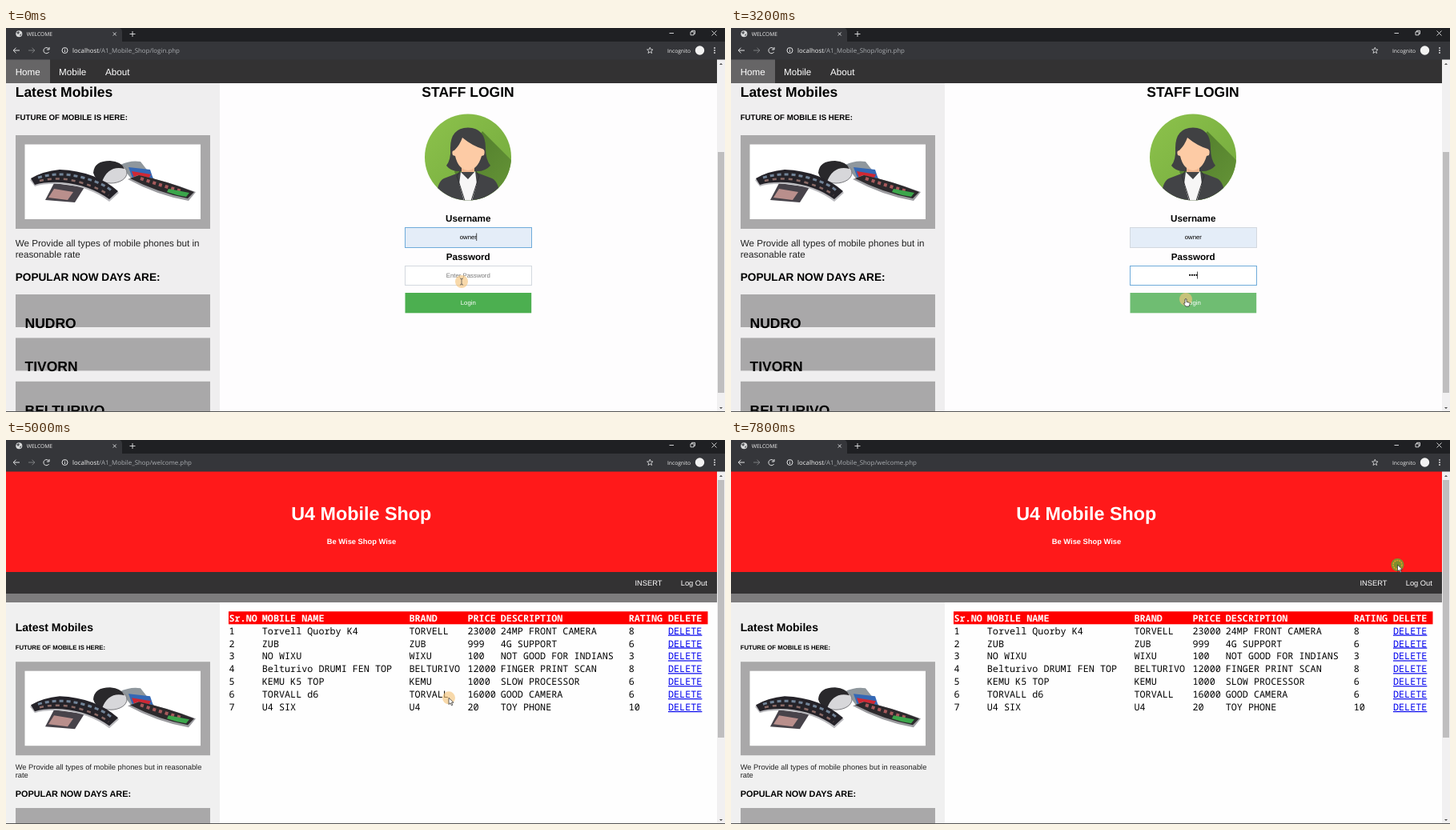
Animation, 898 px wide and 480 px high, one loop 8 s. Source, as an HTML page:

```html
<!DOCTYPE html>
<html lang="en">
<head>
<meta charset="utf-8">
<title>WELCOME</title>
<style>
html, body { margin: 0; width: 100%; height: 100%; overflow: hidden; background: #fefdfe; }
svg { display: block; width: 100%; height: 100%; }
text { font-family: "Liberation Sans", Arial, sans-serif; white-space: pre; text-rendering: geometricPrecision; }
.ui { font-family: "Open Sans", "Noto Sans", sans-serif; font-size: 6.7px; fill: #eee; }
.url { font-size: 7.9px; fill: #a9acb0; }
.bold { font-weight: bold; }
.mid { text-anchor: middle; }
.white { fill: #fff; }
.h2 { font-size: 17.5px; font-weight: bold; }
.p { font-size: 11.67px; }
.field { font-size: 7.8px; text-anchor: middle; }
.small { font-size: 9.34px; }
.table text { font: 11.77px "Noto Sans Mono", "DejaVu Sans Mono", monospace; }
.table .head { font-weight: bold; fill: #fff; }
.table .link { fill: #00e; text-decoration: underline; }
.line { fill: none; stroke: #e4e5e6; }
</style>
</head>
<body>
<svg viewBox="0 0 898 480" preserveAspectRatio="none">
  <defs>
    <clipPath id="disc"><circle cx="577" cy="161.5" r="54"/></clipPath>
    <linearGradient id="green" x2="1" y2="1"><stop stop-color="#8dc24c"/><stop offset="1" stop-color="#72a93c"/></linearGradient>
    <linearGradient id="shade" x2="1" y2="1"><stop stop-color="#4f7a2b"/><stop offset="1" stop-color="#6b9c3a"/></linearGradient>
    <g id="photo">
      <rect x="12" y="134" width="243" height="117" fill="#a9a8a9"/>
      <rect x="23.5" y="145.5" width="219.5" height="93.5" fill="#fff"/>
      <path d="M49 215L60 194 98 199 86 218Z" fill="#47434a"/>
      <path d="M53 212L60 201 84 205 77 215Z" fill="#b98f8c"/>
      <path d="M143 171Q155 165 168 167L186 190 156 188Z" fill="#8f979d"/>
      <path d="M153 174L180 177 184 189 158 188Z" fill="#3568b5"/>
      <path d="M157 179L181 183 177 190 160 187Z" fill="#cf2834"/>
      <ellipse cx="131" cy="181" rx="20" ry="13" fill="#d7d7da" stroke="#77777b"/>
      <path d="M109 181Q110 166 130 166Q144 167 148 176Q128 171 120 192Q111 189 109 181Z" fill="#29282b"/>
      <path d="M30 190Q45 180 67 178Q112 180 141 206L129 217Q104 198 70 195Q48 194 36 198Z" fill="#b9b9bd"/>
      <path d="M31 188Q46 179 67 177Q112 179 140 204L129 214Q104 196 70 193Q48 192 36 196Z" fill="#252329"/>
      <path d="M40 187Q67 179 96 187T133 205" fill="none" stroke="#718397" stroke-width="3" stroke-dasharray="5 4"/>
      <path d="M42 191Q67 185 93 193T128 209" fill="none" stroke="#8a6a66" stroke-width="2.5" stroke-dasharray="5 5"/>
      <path d="M152 189L165 184Q200 191 237 205L228 216Q188 209 152 189Z" fill="#9c9ca0"/>
      <path d="M155 188L166 184Q200 191 235 205L227 213Q190 206 155 188Z" fill="#2c292c"/>
      <path d="M168 188Q194 197 220 204" fill="none" stroke="#a85a5c" stroke-width="4" stroke-dasharray="4 4"/>
      <path d="M203 201L229 206 225 211Q212 209 201 205Z" fill="#3ba64b"/>
    </g>
    <path id="arrow" d="M0 0V8.2L2 6.4 3.4 9.5 4.8 8.9 3.4 5.9H6Z" fill="#fff" stroke="#222" stroke-width=".7"/>
    <path id="hand" d="M-1 0Q0-1 1 0V3.4L4.6 4.3Q5.4 4.7 5 6.2L4 9H0L-2.6 5.4Q-2.4 4.2-1 5.2Z" fill="#fff" stroke="#222" stroke-width=".7"/>
    <path id="beam" d="M-2-4Q0-4 0-2.8Q0-4 2-4M0-3V3M-2 4Q0 4 0 2.8Q0 4 2 4" fill="none" stroke="#444" stroke-width=".7"/>
  </defs>

  <g id="login">
    <rect width="898" height="480" fill="#fefdfe"/>
    <rect y="69" width="267" height="411" fill="#efeeef"/>
    <rect y="39" width="888" height="30" fill="#333233"/>
    <rect y="39" width="55" height="30" fill="#666566"/>
    <g class="p white"><text x="11.7" y="58.6">Home</text><text x="66" y="58.6">Mobile</text><text x="124" y="58.6">About</text></g>
    <text class="h2" x="11.7" y="86">Latest Mobiles</text>
    <text class="bold" x="11.7" y="115.4" font-size="9.69">FUTURE OF MOBILE IS HERE:</text>
    <use href="#photo"/>
    <g class="p" fill="#222"><text x="11.7" y="273">We Provide all types of mobile phones but in</text><text x="11.7" y="286.7">reasonable rate</text></g>
    <text class="bold" x="11.7" y="315.8" font-size="13.65">POPULAR NOW DAYS ARE:</text>
    <g id="brands"></g>

    <text class="h2 mid" x="577" y="86">STAFF LOGIN</text>
    <g clip-path="url(#disc)">
      <rect x="523" y="107" width="108" height="109" fill="url(#green)"/>
      <path d="M595 129L650 184V230H590L560 180Z" fill="url(#shade)"/>
      <path d="M550 172Q556 164 555 150Q555 125 577 124.5Q599 125 599 150Q599 164 605 172Q598 180 586 179H568Q556 180 550 172Z" fill="#404143"/>
      <path d="M569 168H585V183L577 193 569 183Z" fill="#efb58e"/>
      <path d="M537 216Q538 192 547 188L568 180H586L607 188Q616 192 618 216Z" fill="#424346"/>
      <path d="M568 180L577 189 586 179 588 195 582 216H572L566 195Z" fill="#f7f6f6"/>
      <path d="M567 179L563 185 566 194 573 216M587 179L591 185 588 194 581 216" fill="none" stroke="#2f3032"/>
      <path d="M560 153Q567 146 570 137Q582 147 595 151Q599 152 597 159L594 160Q589 177 577 178Q565 177 561 160L558 159Q556 153 560 153Z" fill="#fdcba5"/>
    </g>
    <text class="p bold mid" x="577.2" y="241.8">Username</text>
    <rect id="userBox" x="498.5" y="249.5" width="158" height="25" fill="#e4edf8"/>
    <text class="field" x="577.3" y="263.8">owner</text>
    <text class="p bold mid" x="577.2" y="289.7">Password</text>
    <rect id="passBox" x="498.5" y="297.5" width="158" height="24" fill="#fff"/>
    <text class="field" id="hint" x="577.3" y="311.7" fill="#777">Enter Password</text>
    <g id="dots"></g>
    <path id="caret" stroke="#222" stroke-width=".8"/>
    <rect id="button" x="498.5" y="331" width="157.7" height="25.3"/>
    <text class="field white" x="577.3" y="346.3">Login</text>
  </g>

  <g id="welcome">
    <rect width="898" height="480" fill="#fefefe"/>
    <rect y="39" width="888" height="126" fill="#ff191a"/>
    <rect y="165" width="888" height="27" fill="#333233"/>
    <rect y="192" width="888" height="11" fill="#7d7c7d"/>
    <rect y="203" width="267" height="277" fill="#f0f0f0"/>
    <text class="bold mid white" x="443.7" y="100.3" font-size="23.35">U4 Mobile Shop</text>
    <text class="small bold mid white" x="444" y="129.7">Be Wise Shop Wise</text>
    <g class="small white"><text x="785.5" y="181.5">INSERT</text><text x="842.7" y="181.5">Log Out</text></g>
    <text class="bold" x="11.7" y="238.5" font-size="14">Latest Mobiles</text>
    <text class="bold" x="11.7" y="262" font-size="7.75">FUTURE OF MOBILE IS HERE:</text>
    <use href="#photo" y="143.2"/>
    <g class="small" fill="#222"><text x="11.7" y="411.5">We Provide all types of mobile phones but in reasonable</text><text x="11.7" y="422.3">rate</text></g>
    <text class="bold" x="11.7" y="446" font-size="10.9">POPULAR NOW DAYS ARE:</text>
    <rect x="12" y="460" width="243" height="20" fill="#a9a8a9"/>
    <rect x="278" y="214.3" width="598.5" height="16" fill="#f00"/>
    <g class="table" id="table"></g>
  </g>

  <rect x="888" y="39" width="10" height="441" fill="#f1f0f1"/>
  <rect id="thumb" x="889" width="8" fill="#bfbebf"/>
  <path d="M891 46L893 43.8 895 46ZM891 474L893 476.2 895 474Z" fill="#555"/>
  <rect y="479" width="898" height="1" fill="#555"/>

  <rect width="898" height="18" fill="#1f2023"/>
  <path d="M0 0H142Q145 1 145 5V17H0Z" fill="#35363a"/>
  <rect y="17" width="898" height="22.5" fill="#35363a"/>
  <circle cx="16.3" cy="7.3" r="4" fill="#d9dadb"/>
  <path d="M13 5.5L16 4 17 6 15 8ZM17 8.5L19.5 7 18 10.5Z" fill="#55575b"/>
  <text class="ui" x="25.7" y="9.8">WELCOME</text>
  <path class="line" d="M133.7 5.5L137.7 9.5M137.7 5.5L133.7 9.5M154.5 7.5H161.5M158 4V11M828.5 6.5H834M855 4.8H859V8.8H855ZM856.5 4.8V3.3H860.5V7.3H859M881.5 3.5L887.5 9.5M887.5 3.5L881.5 9.5" stroke-width=".9"/>
  <path class="line" d="M17 28H9.3M12.5 24.7L9.2 28 12.5 31.3M53.6 26.3A3.6 3.6 0 1 0 53.6 30M54 24V27H51"/>
  <path class="line" d="M28 28H35.5M32.5 24.7L35.8 28 32.5 31.3" opacity=".4"/>
  <circle class="line" cx="73.5" cy="28" r="3.5"/>
  <path class="line" d="M73.5 27.5V30M73.5 25.7V26.5"/>
  <text class="ui url" x="83" y="30.8"><tspan fill="#f2f2f2">localhost</tspan><tspan id="address"></tspan></text>
  <path class="line" d="M804.3 24.2L805.3 26.8 808 27 805.9 28.8 806.6 31.5 804.3 30 802 31.5 802.7 28.8 800.6 27 803.3 26.8Z" stroke-width=".8"/>
  <text class="ui" x="826" y="30.5">Incognito</text>
  <circle cx="866.5" cy="28" r="5.7" fill="#f2f2f2"/>
  <g fill="#e4e5e6"><circle cx="885" cy="25" r=".9"/><circle cx="885" cy="28" r=".9"/><circle cx="885" cy="31" r=".9"/></g>

  <g id="pointer">
    <circle id="halo" r="8"/>
    <circle id="ring" r="5.5" fill="none" stroke="#e59a2c" stroke-width="1.5" stroke-dasharray="2 1"/>
    <use id="cursor"/>
  </g>
</svg>
<script>
const LOOP = 8000, STEP = 200;
const FOCUS_AT = 800, TYPE_AT = 1600, SUBMIT_AT = 3600, PAGE_AT = 4200;
const byId = id => document.getElementById(id);
const set = (id, attrs) => {
  for (const [name, value] of Object.entries(attrs)) byId(id).setAttribute(name, value);
};
const show = (id, visible) => { byId(id).style.display = visible ? "" : "none"; };

byId("brands").innerHTML = ["NUDRO", "TIVORN", "BELTURIVO"].map((name, i) => {
  const y = 333 + i * 54.4;
  return `<rect x="12" y="${y}" width="243" height="41" fill="#a9a8a9"/>
    <text class="h2" x="23.5" y="${y + 42}">${name}</text>`;
}).join("");

const columns = [278.5, 319.8, 503.5, 576.5, 617.7, 777.7, 827];
const rows = [
  "Sr.NO|MOBILE NAME|BRAND|PRICE|DESCRIPTION|RATING",
  "1|Torvell Quorby K4|TORVELL|23000|24MP FRONT CAMERA|8",
  "2|ZUB|ZUB|999|4G SUPPORT|6",
  "3|NO WIXU|WIXU|100|NOT GOOD FOR INDIANS|3",
  "4|Belturivo DRUMI FEN TOP|BELTURIVO|12000|FINGER PRINT SCAN|8",
  "5|KEMU K5 TOP|KEMU|1000|SLOW PROCESSOR|6",
  "6|TORVALL d6|TORVALL|16000|GOOD CAMERA|6",
  "7|U4 SIX|U4|20|TOY PHONE|10"
];
byId("table").innerHTML = rows.map((row, r) => [...row.split("|"), "DELETE"].map((cell, c) => {
  const kind = r === 0 ? "head" : c === 6 ? "link" : "";
  return `<text class="${kind}" x="${columns[c]}" y="${226.7 + r * 15.9}">${cell}</text>`;
}).join("")).join("");

// time, x, y
const path = [
  [0, 569, 317], [2000, 568.5, 317], [2400, 568, 332], [2800, 568, 339], [4800, 568, 339],
  [6000, 478, 239], [6800, 850, 239], [7200, 850, 330], [7800, 832.5, 156], [8000, 832.5, 156]
];
function pointerAt(t) {
  const i = path.findIndex(key => key[0] > t);
  const [t0, x0, y0] = path[i - 1], [t1, x1, y1] = path[i];
  const k = (t - t0) / (t1 - t0);
  return [x0 + (x1 - x0) * k, y0 + (y1 - y0) * k];
}

function cursorFor(t, x, y) {
  if (t < PAGE_AT) return y < 323 ? "beam" : y > 333 ? "hand" : "arrow";
  const onLink = x > 827 && x < 870 && y > 231 && y < 340;
  return t <= 4800 || onLink ? "hand" : "arrow";
}

function drawLogin(t, y) {
  const inUser = t < FOCUS_AT, inPass = !inUser && t < SUBMIT_AT;
  const count = Math.max(0, Math.min(4, (t - TYPE_AT) / STEP + 1));
  const border = focused => focused ? "#6fabda" : "#d3d8df";
  set("userBox", { stroke: border(inUser) });
  set("passBox", { stroke: border(inPass) });
  set("button", { fill: y > 333 ? "#6fbd72" : "#4caf50", stroke: t >= SUBMIT_AT ? "#58a9c6" : "none" });
  show("hint", !count);
  byId("dots").innerHTML = Array.from({ length: count }, (_, i) =>
    `<circle cx="${577.3 + (i - (count - 1) / 2) * 2.8}" cy="308.8" r="1.1"/>`).join("");
  const userCaret = inUser && t < 600;
  const passCaret = inPass && count && (t < 2600 || t % 1000 < 500);
  set("caret", { d: userCaret ? "M587.7 256.5V266" : passCaret ? `M${576.9 + count * 1.4} 304.5V313.5` : "" });
}

function draw(t) {
  const [x, y] = pointerAt(t);
  const onLogin = t < PAGE_AT;
  show("login", onLogin);
  show("welcome", !onLogin);
  if (onLogin) drawLogin(t, y);
  set("thumb", onLogin ? { y: 155, height: 301 } : { y: 50, height: 322 });
  byId("address").textContent = `/A1_Mobile_Shop/${onLogin ? "login" : "welcome"}.php`;

  const logout = t >= 7600, pressed = logout || t >= SUBMIT_AT && t < PAGE_AT;
  const tapped = t >= FOCUS_AT && t <= 1000;
  set("pointer", { transform: `translate(${x} ${y})` });
  set("halo", {
    fill: logout ? "#719b2f" : pressed ? "#e2cb42" : tapped ? "#ecd67c" : "#f5c47d",
    opacity: pressed ? 0.9 : 0.65
  });
  show("ring", pressed);
  set("cursor", { href: "#" + cursorFor(t, x, y) });
}

function tick(now) {
  draw(Math.floor(now % LOOP / STEP) * STEP);
  requestAnimationFrame(tick);
}
draw(0);
requestAnimationFrame(tick);
</script>
</body>
</html>
```
